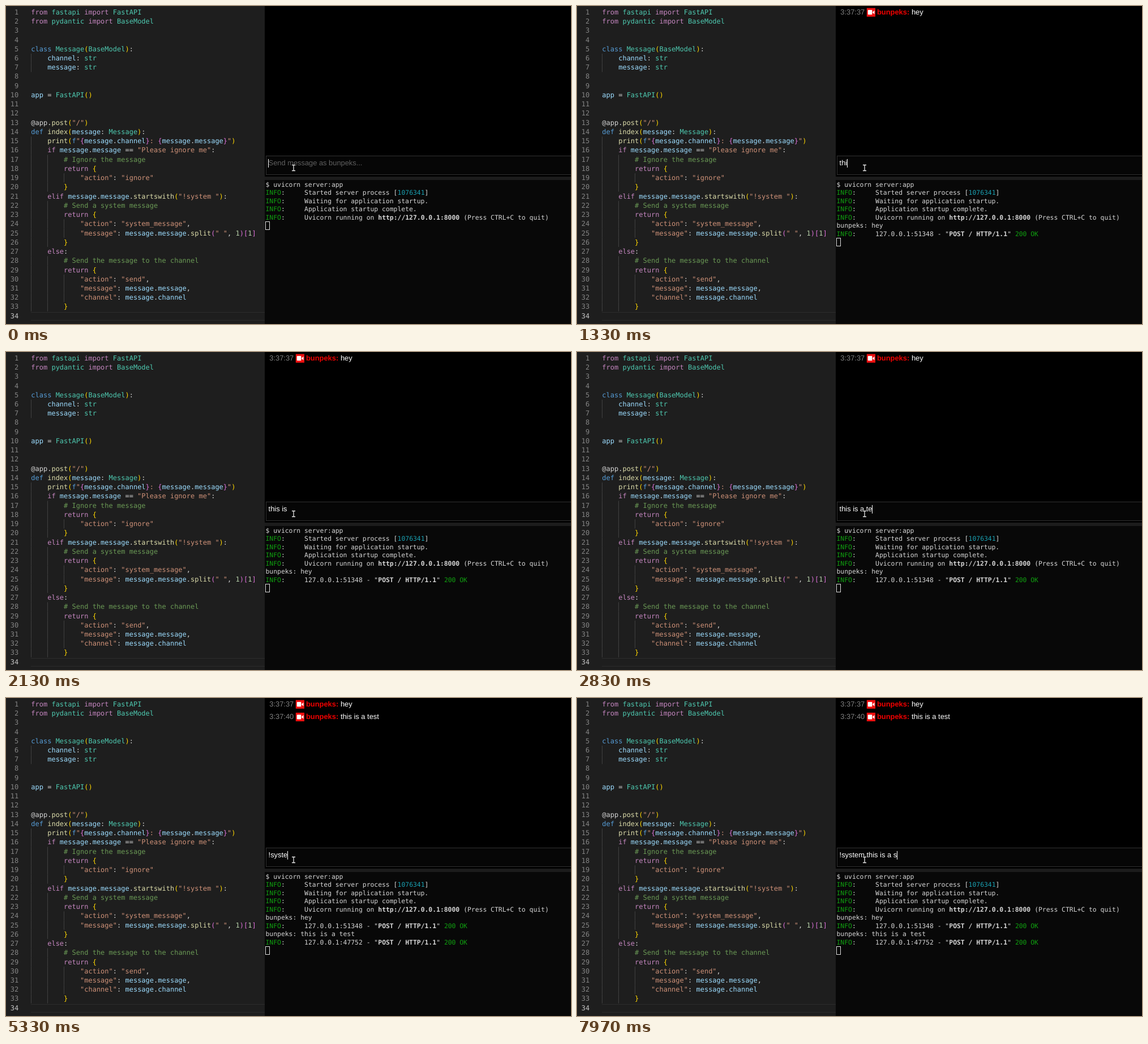
Write an HTML page with a canvas that moves like this. It is 998 px wide and 561 px high and loops after 8000 ms.

```html
<!DOCTYPE html>
<html lang="en">
<head>
<meta charset="utf-8">
<title>Chat server demo</title>
<style>
  html, body { margin: 0; width: 100%; height: 100%; overflow: hidden; background: #000; }
  canvas { display: block; }
</style>
</head>
<body>
<canvas id="stage" width="998" height="561"></canvas>
<script>
const ctx = document.getElementById('stage').getContext('2d');
ctx.textRendering = 'geometricPrecision';

const LOOP = 8000, BLINK = 500;
const PANE_X = 457;
const USER = 'bunpeks';
const SANS = '"Liberation Sans", Arial, sans-serif';
const MONO = '"DejaVu Sans Mono", monospace';
const CHAT_FONT = `12.86px ${SANS}`;

function rect(x, y, w, h, color) {
  ctx.fillStyle = color;
  ctx.fillRect(x, y, w, h);
}

function frame(x, y, w, h, color) {
  ctx.strokeStyle = color;
  ctx.lineWidth = 1;
  ctx.strokeRect(x, y, w, h);
}

function write(text, x, y, color, font, align = 'left') {
  ctx.font = font;
  ctx.textAlign = align;
  ctx.fillStyle = color;
  ctx.fillText(text, x, y);
}

// ---- Editor ----

const SOURCE = `from fastapi import FastAPI
from pydantic import BaseModel


class Message(BaseModel):
    channel: str
    message: str


app = FastAPI()


@app.post("/")
def index(message: Message):
    print(f"{message.channel}: {message.message}")
    if message.message == "Please ignore me":
        # Ignore the message
        return {
            "action": "ignore"
        }
    elif message.message.startswith("!system "):
        # Send a system message
        return {
            "action": "system_message",
            "message": message.message.split(" ", 1)[1]
        }
    else:
        # Send the message to the channel
        return {
            "action": "send",
            "message": message.message,
            "channel": message.channel
        }
`.split('\n');

const TOKEN = new RegExp([
  '(?<comment>#.*)',
  '(?<string>(?<=\\})(?:: |")|"[^"{]*"?)',
  '(?<control>\\b(?:from|import|return|if|elif|else)\\b)',
  '(?<keyword>\\b(?:class|def)\\b|f(?="))',
  '(?<type>\\b(?:fastapi|FastAPI|pydantic|BaseModel|Message|str)\\b)',
  '(?<call>\\w+(?=\\())',
  '(?<number>\\d+)',
  '(?<name>\\w+)',
  '(?<open>[({[])',
  '(?<close>[)}\\]])',
  '(?<other>@\\w+|\\S)'
].join('|'), 'g');

const SYNTAX = {
  comment: '#6a9955', string: '#ce9178', control: '#c586c0', keyword: '#569cd6',
  type: '#4ec9b0', call: '#dcdcaa', number: '#b5cea8', name: '#9cdcfe', other: '#d4d4d4'
};
const BRACKETS = ['#ffd700', '#da70d6', '#179fff'];

function drawEditor() {
  const font = `12px ${MONO}`, left = 44.3, charWidth = 7.224, lineHeight = 16.24;
  let depth = 0;
  rect(0, 0, PANE_X, 561, '#1e1e1e');
  rect(44, 540, PANE_X - 44, 1, '#2c2c2c');
  rect(44, 554, PANE_X - 44, 1, '#2c2c2c');

  SOURCE.forEach((line, row) => {
    const baseline = 14.8 + row * lineHeight;
    const active = row === SOURCE.length - 1;
    write(row + 1, 22.3, baseline, active ? '#c6c6c6' : '#858585', font, 'right');

    const indent = line.search(/\S/);
    for (let col = 0; col < indent; col += 4)
      rect(Math.round(left + col * charWidth), baseline - 12, 1, lineHeight, '#404040');

    for (const match of line.matchAll(TOKEN)) {
      const kind = Object.keys(match.groups).find(key => match.groups[key] !== undefined);
      const color = kind === 'open' ? BRACKETS[depth++ % 3]
        : kind === 'close' ? BRACKETS[--depth % 3]
        : SYNTAX[kind];
      write(match[0], left + match.index * charWidth, baseline, color, font);
    }
  });
}

// ---- Typing timeline: start, delay per key, keys ("\n" sends) ----

const TYPING = [
  [130, 170, 'hey'], [700, 0, '\n'],
  [960, 150, 'thi'], [1400, 70, 's is'], [2180, 150, ' a test'], [3400, 0, '\n'],
  [3600, 0, '!'], [4400, 205, 'system this is a s']
];
const KEYS = TYPING.flatMap(([start, delay, keys]) =>
  [...keys].map((key, i) => ({ key, time: start + i * delay })));

function stateAt(time) {
  const state = { input: '', sent: [], lastKey: 0 };
  for (const { key, time: pressed } of KEYS) {
    if (pressed > time) break;
    state.lastKey = pressed;
    if (key === '\n') {
      state.sent.push(state.input);
      state.input = '';
    } else state.input += key;
  }
  return state;
}

// ---- Chat ----

const CLOCKS = ['3:37:37', '3:37:40'];

function drawBadge(x, y) {
  rect(x, y, 15.2, 15.2, '#f01010');
  ctx.fillStyle = '#fff';
  ctx.beginPath();
  ctx.roundRect(x + 2, y + 3.5, 7.6, 8.2, 1);
  ctx.moveTo(x + 10, y + 7.6);
  ctx.lineTo(x + 13.6, y + 4.2);
  ctx.lineTo(x + 13.6, y + 11);
  ctx.fill();
}

function drawChat({ input, sent, lastKey }, time) {
  rect(PANE_X, 0, 541, 301, '#000');
  sent.forEach((message, i) => {
    const baseline = 15 + i * 22.3;
    write(CLOCKS[i], 465.3, baseline, '#808080', CHAT_FONT);
    drawBadge(511.8, baseline - 11.4);
    write(USER + ':', 530, baseline, '#f00000', 'bold ' + CHAT_FONT);
    write(message, 590.9, baseline, '#fff', CHAT_FONT);
  });

  rect(459, 264, 545, 34, '#060606');
  frame(459.5, 264.5, 545, 33, '#303030');
  if (input) write(input, 463.6, 281, '#fff', CHAT_FONT);
  else write(`Send message as ${USER}...`, 463.6, 281, '#606060', CHAT_FONT);

  if (Math.floor((time - lastKey) / BLINK) % 2 === 0) {
    ctx.font = CHAT_FONT;
    rect(Math.round(463.1 + ctx.measureText(input).width), 270, 1, 15, '#fff');
  }
}

// ---- Terminal ----

const TEXT = '#d6d6d6', GREEN = '#10a010', CYAN = '#1a9fb0';
const PORTS = [51348, 47752];
const info = (...runs) => [['INFO', GREEN], [':     '], ...runs];

const STARTUP = [
  [['$ uvicorn server:app']],
  info(['Started server process ['], ['1076341', CYAN], [']']),
  info(['Waiting for application startup.']),
  info(['Application startup complete.']),
  info(['Uvicorn running on '], ['http://127.0.0.1:8000', TEXT, true], [' (Press CTRL+C to quit)'])
];

function drawTerminal({ sent }) {
  const left = 458.5, charWidth = 6.856, lineHeight = 14.5;
  const font = `11.39px ${MONO}`;
  rect(PANE_X, 301, 541, 6, '#1c1c1c');
  rect(PANE_X, 307, 541, 254, '#080808');

  const lines = STARTUP.concat(sent.flatMap((message, i) => [
    [[`${USER}: ${message}`]],
    info([`127.0.0.1:${PORTS[i]} - "`], ['POST / HTTP/1.1', TEXT, true], ['" '], ['200 OK', GREEN])
  ]));
  lines.forEach((runs, row) => {
    let col = 0;
    for (const [text, color = TEXT, bold] of runs) {
      write(text, left + col * charWidth, 318.8 + row * lineHeight, color, (bold ? 'bold ' : '') + font);
      col += text.length;
    }
  });
  frame(458.5, Math.round(307.5 + lines.length * lineHeight) + 0.5, 7, 14, '#e0e0e0');
}

function drawPointer() {
  const beam = () => {
    ctx.beginPath();
    ctx.moveTo(505, 280.5);
    ctx.lineTo(511, 280.5);
    ctx.moveTo(508, 280.5);
    ctx.lineTo(508, 290.5);
    ctx.moveTo(505, 290.5);
    ctx.lineTo(511, 290.5);
    ctx.stroke();
  };
  ctx.strokeStyle = '#000';
  ctx.lineWidth = 3;
  beam();
  ctx.strokeStyle = '#e8e8e8';
  ctx.lineWidth = 1.3;
  beam();
}

const began = performance.now();

function render() {
  const time = (performance.now() - began) % LOOP;
  const state = stateAt(time);
  drawChat(state, time);
  drawTerminal(state);
  drawPointer();
  requestAnimationFrame(render);
}

drawEditor();
render();
</script>
</body>
</html>
```
